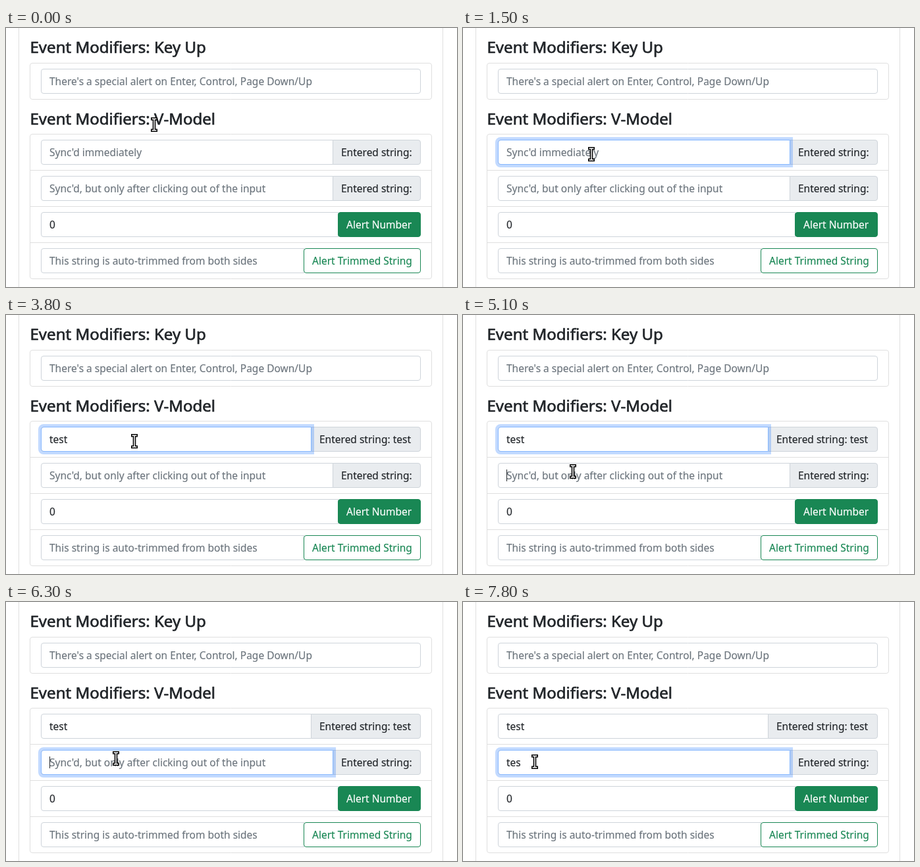
An HTML page with a canvas for the animation above (8 s loop, 685 by 394 pixels).

```html
<!DOCTYPE html>
<html lang="en">
<head>
<meta charset="utf-8">
<title>Form inputs</title>
<style>
  html, body { margin: 0; width: 100%; height: 100%; overflow: hidden; background: #fff; }
  canvas { display: block; width: 685px; height: 394px; }
</style>
</head>
<body>
<canvas id="stage"></canvas>
<script>
const W = 685, H = 394, LOOP = 8000, STEP = 100;
const INK = '#212529', MUTED = '#6c757d', BORDER = '#ced4da', LINE = '#dfdfdf', GREEN = '#198754';
const FONT = '"Noto Sans", "Open Sans", sans-serif';

const canvas = document.getElementById('stage');
const ctx = canvas.getContext('2d');
const dpr = window.devicePixelRatio || 1;
canvas.width = W * dpr;
canvas.height = H * dpr;
ctx.scale(dpr, dpr);

const WORD = 'test';
const CARET_X = [0, 6, 15, 22, 28];           // caret offset after n letters
const ADDON_X = [496, 486, 477, 470, 463];    // label's left edge after n letters
const fields = [
  { focus: 900, fade: 930, keys: [1900, 2100, 2700, 3200], blur: 5100 },
  { focus: 5100, fade: 5150, keys: [6400, 6800, 7200], blur: Infinity }
];
const moves = [
  { start: 0, end: 700, from: [225, 147], to: [195, 192] },
  { start: 3800, end: 4700, from: [195, 192], to: [167, 238] },
  { start: 7200, end: 7500, from: [167, 238], to: [110, 244] },
  { start: 7700, end: 7800, from: [110, 244], to: [109, 243] }
];

const clamp = v => Math.max(0, Math.min(1, v));
const ease = v => v * v * (3 - 2 * v);
const ramp = (t, start, length) => ease(clamp((t - start) / length));

// The 1px border lies inside the box, so its centre line has a smaller radius.
const ALL = 3.5, LEFT = [3.5, 0, 0, 3.5], RIGHT = [0, 3.5, 3.5, 0];

function box(x, y, w, h, fill, stroke, radius = ALL) {
  ctx.beginPath();
  ctx.roundRect(x + 0.5, y + 0.5, w - 1, h - 1, radius);
  if (fill) {
    ctx.fillStyle = fill;
    ctx.fill();
  }
  ctx.lineWidth = 1;
  ctx.strokeStyle = stroke;
  ctx.stroke();
}

function label(str, x, y, size, weight, color) {
  ctx.font = size + 'px ' + FONT;
  ctx.fillStyle = ctx.strokeStyle = color;
  ctx.lineWidth = weight;
  ctx.lineJoin = 'round';
  ctx.fillText(str, x, y);
  ctx.strokeText(str, x, y);
}

const text = (str, x, y, color = INK) => label(str, x, y, 15.5, 0.15, color);
const heading = (str, y) => label(str, 36.5, y, 24.05, 0.7, INK);

function input(y, right, str, color, radius = LEFT) {
  box(53, y, right - 53, 38, '#fff', BORDER, radius);
  text(str, 66, y + 25, color);
}

function focusRing(y, right, amount) {
  if (!amount) return;
  ctx.globalAlpha = amount;
  ctx.fillStyle = 'rgba(13, 110, 253, 0.25)';
  ctx.beginPath();
  ctx.roundRect(49, y - 4, right - 45, 46, [8, 0, 0, 8]);
  ctx.roundRect(53, y, right - 53, 38, [4, 0, 0, 4]);
  ctx.fill('evenodd');
  box(53, y, right - 53, 38, null, '#86b7fe', LEFT);
  ctx.globalAlpha = 1;
}

function syncedRow(t, field, y, hint, live) {
  const count = field.keys.filter(k => t >= k).length;
  const typed = WORD.slice(0, count);
  const left = ADDON_X[live ? count : 0];
  const right = left + 1;

  box(left, y, 630 - left, 38, '#e9ecef', BORDER, RIGHT);
  text('Entered string:' + (live && count ? ' ' + typed : ''), left + 13, y + 25);
  input(y, right, typed || hint, typed ? INK : MUTED);
  focusRing(y, right, ramp(t, field.fade, 180) * (1 - ramp(t, field.blur + 50, 180)));

  if (t < field.focus || t >= field.blur) return;
  const since = t - (count ? field.keys[count - 1] : field.focus);
  if (Math.floor(since / 600) % 2 === 0) {
    ctx.fillStyle = INK;
    ctx.fillRect(66 + CARET_X[count], y + 10, 1, 18);
  }
}

function pointer(t) {
  const m = moves.filter(v => t >= v.start).pop();
  const k = ramp(t, m.start, m.end - m.start);
  const [x, y] = m.from.map((a, i) => Math.round(a + (m.to[i] - a) * k));
  ctx.save();
  ctx.translate(x, y);
  ctx.lineCap = 'square';
  for (const [width, color] of [[4.6, '#000'], [1.5, '#fff']]) {
    ctx.beginPath();
    for (const s of [-1, 1]) {
      ctx.moveTo(-2.7, 8.8 * s);
      ctx.lineTo(2.7, 8.8 * s);
    }
    ctx.moveTo(0, -8);
    ctx.lineTo(0, 8);
    ctx.lineWidth = width;
    ctx.strokeStyle = color;
    ctx.stroke();
  }
  ctx.restore();
}

function draw(t) {
  ctx.fillStyle = '#fff';
  ctx.fillRect(0, 0, W, H);
  ctx.fillStyle = LINE;
  ctx.fillRect(19, 0, 1, H);
  ctx.fillRect(663, 0, 1, H);

  heading('Event Modifiers: Key Up', 38);
  box(36, 53, 611, 56, null, LINE);
  input(62, 630, "There's a special alert on Enter, Control, Page Down/Up", MUTED, ALL);

  heading('Event Modifiers: V-Model', 147);
  box(36, 161, 611, 221, null, LINE);
  ctx.fillStyle = LINE;
  for (const y of [216, 271, 326]) ctx.fillRect(36, y, 611, 1);

  syncedRow(t, fields[0], 170, "Sync'd immediately", true);
  syncedRow(t, fields[1], 225, "Sync'd, but only after clicking out of the input", false);

  input(280, 505, '0', INK);
  box(504, 280, 126, 38, GREEN, GREEN);
  text('Alert Number', 517, 305, '#fff');

  input(335, 453, 'This string is auto-trimmed from both sides', MUTED);
  box(452, 335, 178, 38, '#fff', GREEN);
  text('Alert Trimmed String', 465, 360, GREEN);

  pointer(t);
}

const began = performance.now();
function frame() {
  const t = (performance.now() - began) % LOOP;
  draw(Math.floor(t / STEP) * STEP);
  requestAnimationFrame(frame);
}
frame();
</script>
</body>
</html>
```
